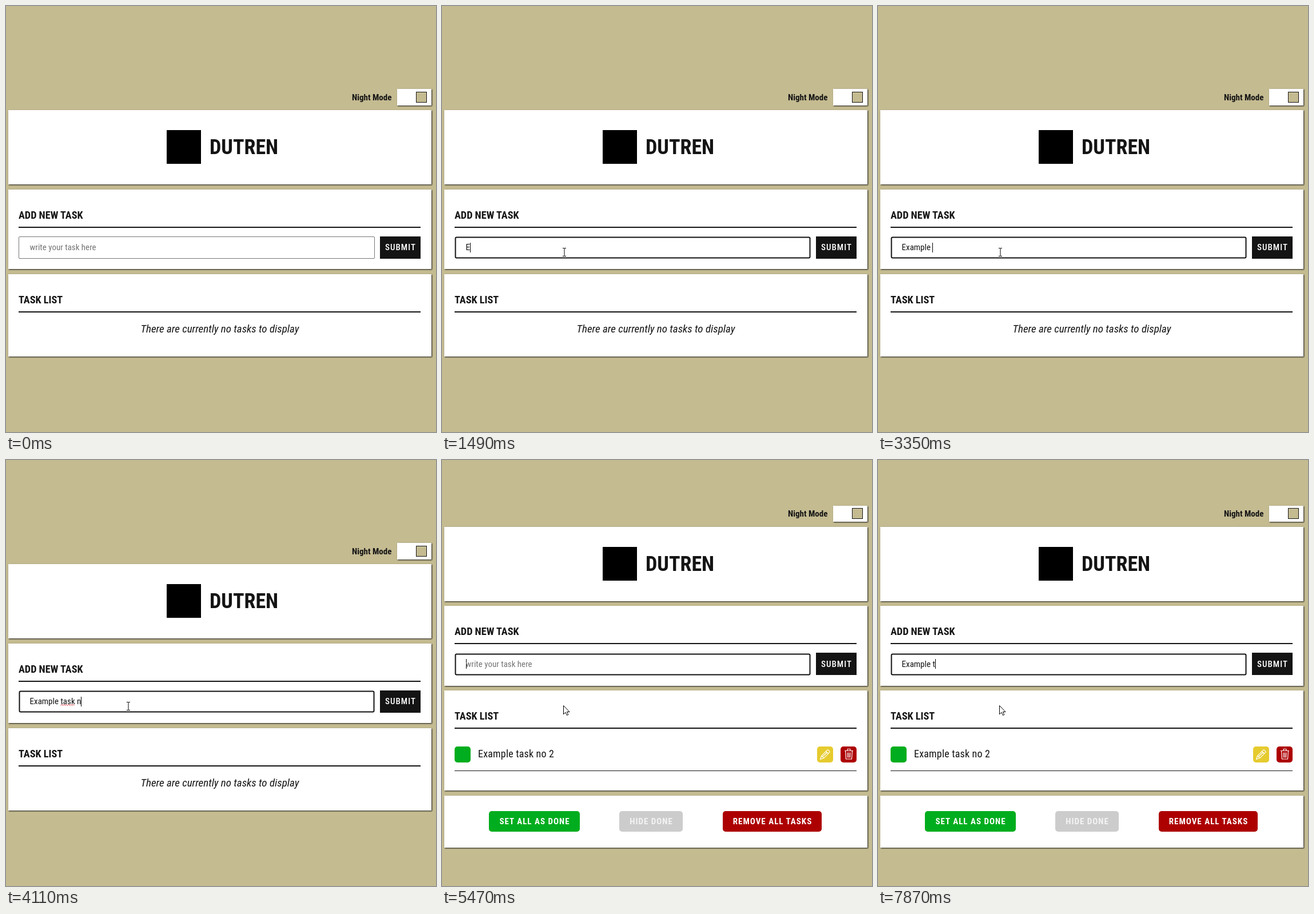
An HTML page for the animation above (7990 ms loop, 752 px wide and 745 px high).

```html
<!DOCTYPE html>
<html lang="en">
<head>
<meta charset="utf-8">
<title>Task list</title>
<style>
  html, body { margin: 0; width: 100%; height: 100%; overflow: hidden; background: #c4bb91; }
  body {
    --fit: 0px; --ink: #141414; --green: #00ad1e; --red: #ad0000;
    position: relative; color: var(--ink);
    font: 400 15px "Roboto Condensed", Roboto, sans-serif; font-stretch: 75%;
  }
  body.wide { --fit: -.055em; }
  * { box-sizing: border-box; letter-spacing: calc(var(--ls, 0px) + var(--fit)); }
  #page, #full { position: absolute; left: 0; top: 0; width: 752px; height: 745px; }
  .box, .text, svg { position: absolute; }
  .box { left: calc(var(--x) * 1px); top: calc(var(--y) * 1px); width: calc(var(--w) * 1px); height: calc(var(--h) * 1px); }
  /* --y is the middle of the text line */
  .text { left: calc(var(--x) * 1px); top: calc(var(--y) * 1px - 10px); line-height: 20px; white-space: pre; }
  .card { background: #fff; box-shadow: 1px 1px 2px var(--ink); }
  .bold { font-weight: 700; }
  .head { font-size: 18.2px; font-weight: 700; }
  .title { font-size: 36px; font-weight: 700; }
  .item { font-size: 18px; --ls: .2px; }
  .note { font-size: 19px; font-style: italic; }
  .rule, .logo { background: var(--ink); }
  .logo { background: #000; }
  .knob { background: #c4bb91; border: 1px solid var(--ink); }
  .field { background: #fff; border: 1px solid #767676; border-radius: 2px; }
  .focus .field { border-color: transparent; }
  .entry { display: flex; align-items: center; }
  #caret { width: 1px; height: 17px; margin-right: -1px; background: #000; }
  #hint { color: #757575; }
  .btn { display: flex; align-items: center; justify-content: center; padding-left: 1px; color: #fff; --ls: 1px; white-space: pre; }
  .submit { background: var(--ink); font-weight: 500; }
  .round { border-radius: 5px; font-weight: 700; }
  .green { background: var(--green); }
  .red { background: var(--red); }
  .gold { background: #e6cb2f; }
  .gray { background: #ccc; color: #f3f3f3; }
  #full, .filled .none { visibility: hidden; }
  .filled #full { visibility: visible; }
  .filled #page { top: -65.5px; }
  .filled .list { height: 175px; }
  svg { left: 0; top: 0; overflow: visible; fill: none; }
</style>
</head>
<body>
  <div id="page">
    <div class="text bold" style="--x:605;--y:159.5">Night Mode</div>
    <div class="box card" style="--x:683.5;--y:145;--w:60.5;--h:28.5"></div>
    <div class="box knob" style="--x:716.5;--y:149.5;--w:19;--h:19"></div>

    <div class="box card" style="--x:4;--y:182;--w:740;--h:130"></div>
    <div class="box logo" style="--x:281;--y:217;--w:60;--h:59"></div>
    <div class="text title" style="--x:356;--y:247">DUTREN</div>

    <div class="box card" style="--x:4;--y:320.5;--w:740;--h:139.5"></div>
    <div class="text head" style="--x:22;--y:365.5">ADD NEW TASK</div>
    <div class="box rule" style="--x:22;--y:385.5;--w:703;--h:2"></div>
    <div class="box field" style="--x:22;--y:402.5;--w:623;--h:39"></div>
    <svg width="752" height="745">
      <rect id="ring" x="23.5" y="404.5" width="620" height="36" rx="2" stroke="#101010" stroke-width="2"/>
      <path id="wavy" stroke="#e0303a"/>
    </svg>
    <div class="text entry" style="--x:41.6;--y:422"><span id="typed"></span><span id="caret"></span><span id="hint">write your task here</span></div>
    <div class="box btn submit" style="--x:654;--y:402.5;--w:71;--h:39">SUBMIT</div>

    <div class="box card list" style="--x:4;--y:468.5;--w:740;--h:144.5"></div>
    <div class="text head" style="--x:22;--y:513.5">TASK LIST</div>
    <div class="box rule" style="--x:22;--y:533.5;--w:703;--h:2"></div>
    <div class="text note none" id="empty" style="--x:235.4;--y:565">There are currently no tasks to display</div>
  </div>

  <div id="full">
    <div class="box round green" style="--x:22;--y:501;--w:28;--h:28"></div>
    <div class="text item" style="--x:63;--y:514">Example task no 2</div>
    <div class="box round gold" style="--x:656;--y:501;--w:28;--h:28"></div>
    <div class="box round red" style="--x:697;--y:501;--w:28;--h:28"></div>
    <svg width="752" height="745" stroke="#fff" stroke-width="1.2" stroke-linejoin="round">
      <path d="M661.5 523.5l2.2-6.2 10-10q1-.8 2 0l2 2q.8 1 0 2l-10 10zM671.5 509.5l4 4M663.7 517.3l4 4M665.5 519l8-8"/>
      <path d="M704 508.5h15M709 508v-2.5h5v2.5M705.5 509l1 14h10l1-14M709 511.5l.4 9M711.5 511.5v9M714 511.5l-.4 9"/>
    </svg>
    <div class="box rule" style="--x:22;--y:543;--w:703;--h:1"></div>

    <div class="box card" style="--x:4;--y:587;--w:740;--h:91"></div>
    <div class="box btn round green" style="--x:82;--y:614;--w:159;--h:36">SET ALL AS DONE</div>
    <div class="box btn round gray" style="--x:310;--y:614;--w:111;--h:36">HIDE DONE</div>
    <div class="box btn round red" style="--x:491;--y:614;--w:173;--h:36">REMOVE ALL TASKS</div>
  </div>

  <svg id="pointer" width="24" height="24">
    <path id="arrow" d="M.5.5v15.2l3.5-3.3 2.4 5.1 2.4-1.1-2.4-4.9h4.6z" fill="#fff" stroke="#000"/>
    <path id="beam" d="M-3 -6.5h2.5l.5 .5 .5-.5h2.5M-3 7.5h2.5l.5-.5 .5 .5h2.5M0 -6v13" stroke="#000"/>
  </svg>

<script>
  const LOOP = 7990, FOCUS = 1240, SUBMIT = 5470;
  const TASK = 'Example task no 2';
  // [time, typed letters, caret hidden]
  const typing = [
    [0, 0, 1], [FOCUS, 0], [1490, 1], [1750, 2], [1990, 3], [2110, 4], [2360, 5], [2490, 6],
    [2970, 7], [3350, 8], [3480, 9], [3605, 10], [3730, 11], [3860, 12], [3985, 13], [4110, 14],
    [4240, 15], [4350, 16], [4850, 16, 1], [5210, 17],
    [SUBMIT, 0], [6110, 0, 1], [6610, 1], [6870, 2], [6980, 3], [7240, 4],
    [7500, 5], [7620, 7], [7750, 8], [7870, 9]
  ];
  // [time, x, y, shape]
  const moves = [
    [0, 0, 0, ''], [480, 388, 587, 'arrow'], [640, 300, 514, 'arrow'], [730, 243, 451, 'arrow'],
    [880, 228, 439, 'beam'], [1000, 217, 432, 'beam'], [1110, 214, 430, 'beam'], [SUBMIT, 212, 429, 'arrow']
  ];

  const el = id => document.getElementById(id);
  const show = (id, on) => { el(id).style.visibility = on ? 'inherit' : 'hidden'; };
  const at = (steps, t) => steps.filter(s => s[0] <= t).pop();

  // Tighten the letters when no condensed face is available
  if (el('empty').offsetWidth > 298) document.body.classList.add('wide');
  el('wavy').setAttribute('d', 'M95.5 429.5' + 'l2-2 2 2'.repeat(6));

  function draw(now) {
    const t = now % LOOP;
    const [, count, hidden] = at(typing, t);
    const [, x, y, shape] = at(moves, t);
    document.body.classList.toggle('focus', t >= FOCUS);
    document.body.classList.toggle('filled', t >= SUBMIT);
    el('typed').textContent = TASK.slice(0, count);
    show('ring', t >= FOCUS);
    show('caret', !hidden);
    show('hint', !count);
    show('wavy', count > 12);
    show('arrow', shape === 'arrow');
    show('beam', shape === 'beam');
    el('pointer').style.transform = `translate(${x}px, ${y}px)`;
  }

  const start = performance.now();
  function tick() {
    draw(performance.now() - start);
    requestAnimationFrame(tick);
  }
  tick();
</script>
</body>
</html>
```
